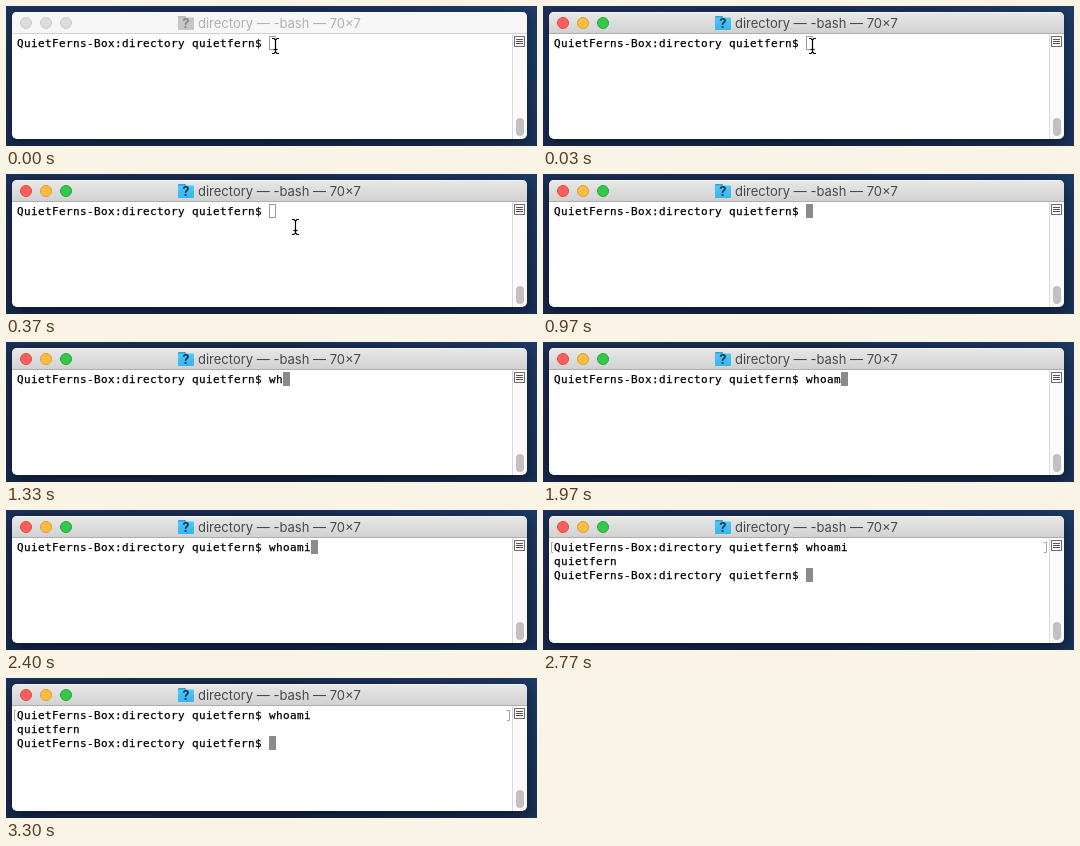
Write an HTML page with a canvas that moves like this. It is 531 by 140 pixels and loops after 3760 ms.

```html
<!DOCTYPE html>
<html lang="en">
<head>
<meta charset="utf-8">
<title>Terminal</title>
<style>
html, body { margin: 0; width: 100%; height: 100%; overflow: hidden; background: #15264a; }
canvas { display: block; width: 531px; height: 140px; }
</style>
</head>
<body>
<canvas id="stage" width="531" height="140"></canvas>
<script>
const ctx = document.getElementById('stage').getContext('2d');
const LOOP = 3760;
const CELL = { w: 7, h: 14, x: 11, y: 30 };
const PROMPT = 'QuietFerns-Box:directory quietfern$ ';
const USER = 'quietfern';
const COMMAND = 'whoami';
const KEY_TIMES = [1000, 1330, 1530, 1830, 1970, 2400];
const FOCUS = 30, READY = 970, ENTER = 2730, OUTPUT = 2770;

// [start time, x, y]; a missing position hides the pointer
const POINTER = [
  [0, 269, 40], [330, 276, 45], [370, 289, 53], [400, 299, 59],
  [READY], [3230, 304, 59], [3270, 411, 31], [3300]
];

function roundRect(x, y, w, h, r) {
  ctx.beginPath();
  ctx.roundRect(x, y, w, h, r);
}

function fillRect(color, x, y, w, h) {
  ctx.fillStyle = color;
  ctx.fillRect(x, y, w, h);
}

function gradient(x0, y0, x1, y1, ...colors) {
  const g = ctx.createLinearGradient(x0, y0, x1, y1);
  colors.forEach((c, i) => g.addColorStop(i / (colors.length - 1), c));
  return g;
}

function polyline(color, width, ...points) {
  ctx.strokeStyle = color;
  ctx.lineWidth = width;
  ctx.beginPath();
  points.forEach(([x, y]) => ctx.lineTo(x, y));
  ctx.stroke();
}

function drawDesktop() {
  fillRect(gradient(0, 0, 531, 0, '#1b3058', '#172b52', '#1b3a64'), 0, 0, 531, 140);
  fillRect(gradient(0, 0, 0, 140, 'rgba(8,16,36,0)', 'rgba(8,16,36,.25)'), 0, 0, 531, 140);
}

function drawFrame(active, t) {
  const grow = Math.min(1, Math.max(0, (t - FOCUS + 30) / 130));
  ctx.save();
  ctx.shadowColor = `rgba(0,0,0,${0.35 + 0.15 * grow})`;
  ctx.shadowBlur = 8 + 6 * grow;
  ctx.shadowOffsetY = 3;
  ctx.fillStyle = '#fff';
  roundRect(6, 6, 515, 127, 5);
  ctx.fill();
  ctx.restore();

  ctx.save();
  roundRect(6, 6, 515, 127, 5);
  ctx.clip();
  fillRect(active ? gradient(0, 6, 0, 27, '#e9e9e9', '#d1d1d1') : '#f6f6f6', 6, 6, 515, 21);
  fillRect(active ? '#f5f5f5' : '#fbfbfb', 6, 6, 515, 1);
  fillRect(active ? '#afafaf' : '#d2d2d2', 6, 27, 515, 1);
  ctx.restore();
}

function drawButtons(active) {
  const colors = active
    ? [['#fc605c', '#df4a45'], ['#fdbc40', '#de9f34'], ['#34c84a', '#27a935']]
    : Array(3).fill(['#dcdcdc', '#c9c9c9']);
  colors.forEach(([fill, edge], i) => {
    ctx.beginPath();
    ctx.arc(20 + 20 * i, 17, 5.5, 0, Math.PI * 2);
    ctx.fillStyle = fill;
    ctx.fill();
    ctx.strokeStyle = edge;
    ctx.lineWidth = 1;
    ctx.stroke();
  });
}

function drawTitle(active) {
  ctx.fillStyle = active ? '#26a5e4' : '#b9b9b9';
  roundRect(172, 10, 8, 5, 1);
  ctx.fill();
  ctx.fillStyle = active ? gradient(0, 11, 0, 24, '#52c8fa', '#35b5f0') : '#c6c6c6';
  roundRect(172, 11.5, 16, 12.5, 1);
  ctx.fill();

  ctx.textAlign = 'center';
  ctx.fillStyle = active ? '#173a4e' : '#858585';
  ctx.font = 'bold 13px Inter, sans-serif';
  ctx.fillText('?', 180, 22);

  ctx.textAlign = 'left';
  ctx.fillStyle = active ? '#484848' : '#b2b2b2';
  ctx.font = '13px Inter, sans-serif';
  ctx.fillText('directory — -bash — 70×7', 192, 22);
}

function drawScroller() {
  fillRect('#fafafa', 506, 28, 15, 100);
  fillRect('#dadada', 506, 28, 1, 105);
  ctx.strokeStyle = '#707070';
  ctx.lineWidth = 1;
  ctx.strokeRect(508.5, 30.5, 10, 10);
  for (let y = 33; y <= 37; y += 2) fillRect('#555', 510, y, 7, 1);
  ctx.fillStyle = '#c1c1c1';
  roundRect(510, 112, 8, 18, 4);
  ctx.fill();
}

// Each glyph sits on a whole-pixel cell, as in a terminal grid
function drawLine(text, row) {
  ctx.font = '11px "DejaVu Sans Mono", monospace';
  ctx.textAlign = 'left';
  ctx.fillStyle = ctx.strokeStyle = '#000';
  ctx.lineWidth = 0.25;
  [...text].forEach((ch, i) => {
    const x = CELL.x + i * CELL.w, y = CELL.y + row * CELL.h + 11;
    ctx.fillText(ch, x, y);
    ctx.strokeText(ch, x, y);
  });
}

function drawCursor(col, row, solid) {
  const x = CELL.x + col * CELL.w, y = CELL.y + row * CELL.h;
  if (solid) {
    fillRect('#8b8b8b', x, y, CELL.w, CELL.h);
  } else {
    ctx.strokeStyle = '#9a9a9a';
    ctx.lineWidth = 1;
    ctx.strokeRect(x + 0.5, y + 0.5, CELL.w - 1, CELL.h - 1);
  }
}

function drawShell(t) {
  const typed = COMMAND.slice(0, KEY_TIMES.filter(k => t >= k).length);
  drawLine(PROMPT + typed, 0);
  if (t < ENTER) {
    drawCursor(PROMPT.length + typed.length, 0, t >= READY);
    return;
  }
  polyline('#a6a6a6', 1, [10, 32.5], [8.5, 32.5], [8.5, 42.5], [10, 42.5]);
  polyline('#a6a6a6', 1, [501, 32.5], [503.5, 32.5], [503.5, 42.5], [501, 42.5]);
  if (t < OUTPUT) {
    drawCursor(0, 1, true);
  } else {
    drawLine(USER, 1);
    drawLine(PROMPT, 2);
    drawCursor(PROMPT.length, 2, true);
  }
}

function drawPointer(t) {
  const [, x, y] = POINTER.filter(p => t >= p[0]).pop();
  if (x === undefined) return;
  ctx.save();
  ctx.translate(x + 0.5, y);
  for (const [color, width] of [['#fff', 3], ['#000', 1.2]]) {
    polyline(color, width, [-3.5, -7.5], [-1.5, -7.5], [0, -6], [0, 6], [-1.5, 7.5], [-3.5, 7.5]);
    polyline(color, width, [3.5, -7.5], [1.5, -7.5], [0, -6]);
    polyline(color, width, [3.5, 7.5], [1.5, 7.5], [0, 6]);
    polyline(color, width, [-2, 3.5], [2, 3.5]);
  }
  ctx.restore();
}

const start = performance.now();

function render() {
  const t = Math.max(0, performance.now() - start) % LOOP;
  const active = t >= FOCUS;
  drawDesktop();
  drawFrame(active, t);
  drawButtons(active);
  drawTitle(active);
  drawScroller();
  drawShell(t);
  drawPointer(t);
  requestAnimationFrame(render);
}

render();
</script>
</body>
</html>
```
